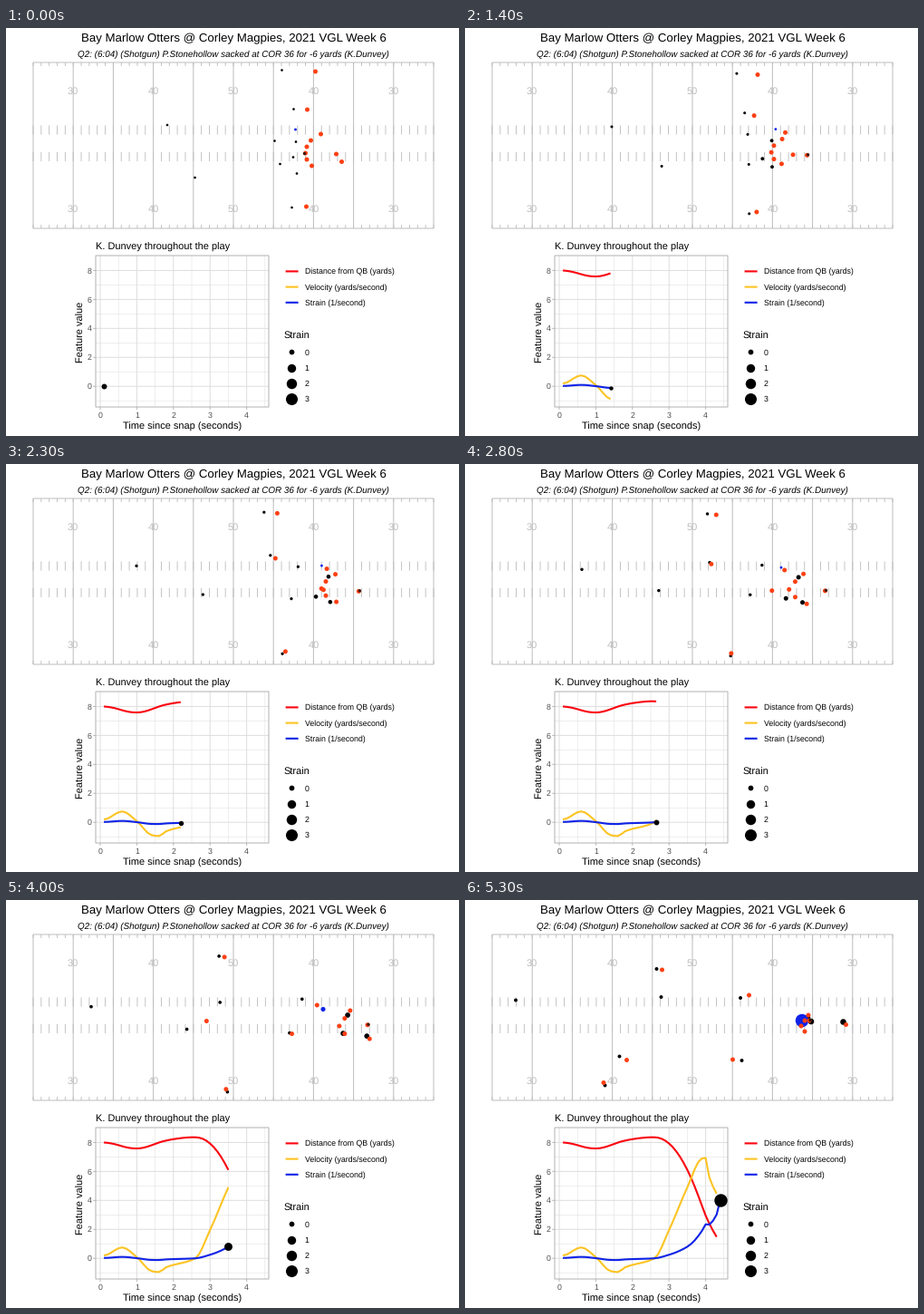
Write a matplotlib script that moves like this. It is 500 by 450 pixels and loops after 6000 ms.

```python
import numpy as np
import matplotlib.pyplot as plt
from matplotlib.animation import FuncAnimation

W, H, DPI = 500, 450, 100
PT = 72 / DPI
TICK_MS, LOOP_MS = 50, 6000
STEPS = 64

BLACK, ORANGE, BALL = "#000000", "#fb4014", "#3d1a10"
RED, YELLOW, BLUE = "#fa0510", "#fcc423", "#0f23e6"
FIELD_GREY, PANEL_GREY, GRID = "#bebebe", "#b3b3b3", "#dedede"

plt.rcParams["font.family"] = "Liberation Sans"
plt.rcParams["text.hinting"] = "none"

fig = plt.figure(figsize=(W / DPI, H / DPI), dpi=DPI, facecolor="white")
ax = fig.add_axes([0, 0, 1, 1])
ax.set(xlim=(0, W), ylim=(H, 0))
ax.axis("off")


def text(x, y, s, size, color="black", ha="left", **kw):
    """Text whose capitals are vertically centred on y."""
    ax.text(x, y + 0.36 * size, s, size=size * PT, color=color, ha=ha,
            va="baseline", **kw)


def columns(xs, y0, y1, color, width=1.0):
    ax.vlines(xs, y0, y1, color=color, lw=width * PT, zorder=1, snap=False)


def rows(ys, x0, x1, color, width=1.0):
    ax.hlines(ys, x0, x1, color=color, lw=width * PT, zorder=1, snap=False)


def area(r):
    return (2 * np.asarray(r) * PT) ** 2


def curve(keys, points):
    """Monotone cubic through the points, at rest at both ends."""
    keys = np.asarray(keys, float)
    v = np.asarray(points, float).T
    h = np.diff(keys)
    d = np.diff(v) / h
    a, b = d[..., :-1], d[..., 1:]
    m = np.zeros_like(v)
    m[..., 1:-1] = np.where(a * b > 0, 2 * a * b / np.where(a * b > 0, a + b, 1), 0)

    def at(t):
        i = np.clip(np.searchsorted(keys, t, "right") - 1, 0, len(h) - 1)
        u = (t - keys[i]) / h[i]
        rise = u * u * (3 - 2 * u)
        return (v[..., i] * (1 - rise) + v[..., i + 1] * rise
                + h[i] * u * (1 - u) * (m[..., i] * (1 - u) - m[..., i + 1] * u))
    return at


# ---- Measured features of the rusher -------------------------------------
T = 0.1 * np.arange(1, 45)
speed_knots = ((.1, .2), (.6, .75), (1, .08), (1.4, -.88), (1.6, -.95),
               (1.8, -.62), (2.6, 0), (3, 1.95), (3.5, 4.9), (3.9, 6.9),
               (4, 6.93), (4.1, 5.6), (4.4, 4.27))
velocity = curve(*zip(*speed_knots))(T)
covered = np.cumsum(velocity) - velocity[0]
distance = 8 - 6.94 * covered / covered[-1]
strain = velocity / distance


def strain_radius(s):
    low, high = strain.min(), strain.max()
    return 2.0 + 5.2 * np.sqrt(np.clip((s - low) / (high - low), 0, 1))


# ---- Clock ---------------------------------------------------------------
KEY_STEPS = np.round(STEPS * np.arange(44) / 43)


def play_time(ms):
    """Seconds since the snap; the playback slows down after 3.1 s."""
    k = int((ms + TICK_MS - 0.1) / 74.4)
    if k > 42:
        k = 42 + (ms - 3100) // 100
    return float(np.interp(min(k, STEPS), KEY_STEPS, T))


# ---- Players -------------------------------------------------------------
KEYS = (0.1, 1.8, 3.2, 4.4)
LATE = (0.1, 1.8, 3.9, 4.4)
players = []


def add(path, color=ORANGE, radius=lambda t: 2.5):
    players.append((path, color, radius))
    return path


def route(*points, keys=KEYS):
    return curve(keys, points)


def shadow(mark, start, end):
    """Follow another path while the gap to it closes."""
    start, end = np.array(start), np.array(end)
    return lambda t: mark(t) + start + (end - start) * min((t - 0.1) / 2.9, 1)


def cover_radius(t):
    return 1.3 + 0.15 * t


def rush_radius(t):
    return 1.3 + 0.45 * t


def star_radius(t):
    return 1.4 + 1.45 * max(np.interp(t, T, strain), 0)


wide = route((341.5, 48), (313.5, 53), (252.5, 59), (217.5, 77))
slot = route((332.5, 90), (311.5, 100), (239.5, 121), (178.5, 176.5))
low = route((331.5, 197), (316.5, 205), (269.5, 210), (153, 201.5))
end = route((347.5, 117), (354.5, 115), (350, 118), (313.5, 105))
back = route((370.5, 147.5), (357.5, 138.5), (324, 141.5), (295.5, 176))
passer = route((364.5, 139), (383, 140.5), (402.5, 139), (380, 133))
edge = route((321, 160.5), (347.5, 152), (389.5, 153), (417.5, 134.5))

coverage = (
    shadow(wide, (-37, -1.5), (-6, -1)),
    shadow(low, (-16, 1), (1.5, 3)),
    route((317.5, 89.5), (303.5, 96), (246, 114), (216.5, 107)),
    route((178, 107), (154, 110), (108.5, 119), (56, 110.5)),
    route((208.5, 165), (218.5, 148), (207.5, 137), (170.5, 172.5)),
    route((296.5, 124.5), (317.5, 115), (331, 110), (304, 108)),
    route((302.5, 150), (315, 150.5), (314.5, 141), (305.5, 177)))
rush = (
    route((320, 125.5), (346.5, 124), (376.5, 126), (378, 130)),
    route((317, 142.5), (334, 145), (367, 149.5), (382, 134)),
    edge)

for path in coverage:
    add(path, BLACK, cover_radius)
for path in rush:
    add(path, BLACK, rush_radius)
add(route((319.5, 112), (347.5, 111.5), (351, 124), (372, 133), keys=LATE),
    BLUE, star_radius)

for path in (wide, slot, low, end, back, passer):
    add(path)
# The line bends into a pocket around the passer
for i in range(-2, 2):
    add(route((330.5 + 1.5 * i * i, 138 + 7 * i),
              (342 + 3.5 * i * i, 137 + 7.5 * i),
              (366 + 7 * abs(i), 139 + 9 * i),
              (371 + 4 * abs(i), 139 + 6 * i)))
add(shadow(edge, (16.5, -8.5), (3, 3)))


def ball(t):
    """Snapped from the line into the passer's hands."""
    snap = np.array([329.5, 138.5])
    held = passer(t) + [1, -0.5]
    return snap + (held - snap) * min((t - 0.1) / 1.05, 1)


add(ball, BALL, lambda t: 1.7)


# ---- Field ---------------------------------------------------------------
text(251.5, 10.7, "Bay Marlow Otters @ Corley Magpies, 2021 VGL Week 6", 13.2,
     ha="center")
text(251, 28, "Q2: (6:04) (Shotgun) P.Stonehollow sacked at COR 36 "
     "for -6 yards (K.Dunvey)", 9.9, ha="center", style="italic")

LEFT, RIGHT, TOP, BOTTOM = 30, 472, 38, 221
yards = np.linspace(LEFT, RIGHT, 51)
rows([TOP, BOTTOM], LEFT, RIGHT, FIELD_GREY)
columns(yards[::5], TOP, BOTTOM, FIELD_GREY)
for y0, y1 in ((TOP, 42), (107.5, 117.5), (137, 147), (217, BOTTOM)):
    columns(yards, y0, y1, FIELD_GREY, 0.9)
for x, s in zip(yards[5::10], ("30", "40", "50", "40", "30")):
    for y in (69.2, 199):
        text(x, y, s, 11, FIELD_GREY, "center")


# ---- Chart ---------------------------------------------------------------
def px(t):
    return 104 + 40.4 * np.asarray(t)


def py(v):
    return 395.2 - 15.97 * np.asarray(v)


X0, X1, Y0, Y1 = 99, 290, 251, 418
columns(px(np.arange(0.5, 5)), Y0, Y1, GRID, 0.5)
rows(py(np.arange(-1, 9, 2)), X0, X1, GRID, 0.5)
columns(px(np.arange(5)), Y0, Y1, GRID)
rows(py(np.arange(0, 9, 2)), X0, X1, GRID)
ax.add_patch(plt.Rectangle((X0, Y0), X1 - X0, Y1 - Y0, fill=False,
                           ec=PANEL_GREY, lw=PT, zorder=8, snap=False))
for t in range(5):
    columns([px(t)], Y1, Y1 + 2.7, PANEL_GREY)
    text(px(t), 426.6, str(t), 8.8, "#4d4d4d", "center")
for v in range(0, 9, 2):
    rows([py(v)], X0 - 2.7, X0, PANEL_GREY)
    text(94.5, py(v), str(v), 8.8, "#4d4d4d", "right")

text(99, 240.3, "K. Dunvey throughout the play", 11)
text(194.8, 439.1, "Time since snap (seconds)", 11, ha="center")
text(81.5, 335, "Feature value", 11, ha="center", rotation=90,
     rotation_mode="anchor")
ax.texts[-1].set_position((85.4, 335))

# ---- Legends -------------------------------------------------------------
labels = ("Distance from QB (yards)", "Velocity (yards/second)",
          "Strain (1/second)")
for i, (label, color) in enumerate(zip(labels, (RED, YELLOW, BLUE))):
    y = 268.4 + 17.2 * i
    rows([y], 308.6, 322.6, color, 2.1)
    text(329.8, y, label, 8.8)

text(306.8, 339.4, "Strain", 11)
for s in range(4):
    y = 357.3 + 17.3 * s
    ax.scatter([315.2], [y], s=area(strain_radius(s)), c=BLACK, lw=0)
    text(329.8, y, str(s), 8.8)

# ---- Moving parts --------------------------------------------------------
lines = []
for data, color, stop in ((distance, RED, 4.3), (velocity, YELLOW, 4.3),
                          (strain, BLUE, 4.4)):
    line, = ax.plot([], [], color=color, lw=2.1 * PT, zorder=5,
                    solid_capstyle="butt", solid_joinstyle="round")
    lines.append((line, data, stop))

marker = ax.scatter([0], [0], c=BLACK, lw=0, zorder=9)
dots = ax.scatter([0] * len(players), [0] * len(players),
                  c=[color for _, color, _ in players], lw=0, zorder=6)


def update(i):
    t = play_time(i * TICK_MS)
    for line, data, stop in lines:
        last = min(t, stop)
        ts = np.append(T[T < last - 1e-9], last)
        line.set_data(px(ts), py(np.interp(ts, T, data)))

    s = np.interp(t, T, strain)
    marker.set_offsets([[px(t), py(s)]])
    marker.set_sizes([area(strain_radius(s))])

    dots.set_offsets([path(t) for path, _, _ in players])
    dots.set_sizes(area([radius(t) for _, _, radius in players]))
    return [line for line, _, _ in lines] + [marker, dots]


anim = FuncAnimation(fig, update, frames=LOOP_MS // TICK_MS, interval=TICK_MS,
                     repeat=True, repeat_delay=0, blit=False)
plt.show()
```
